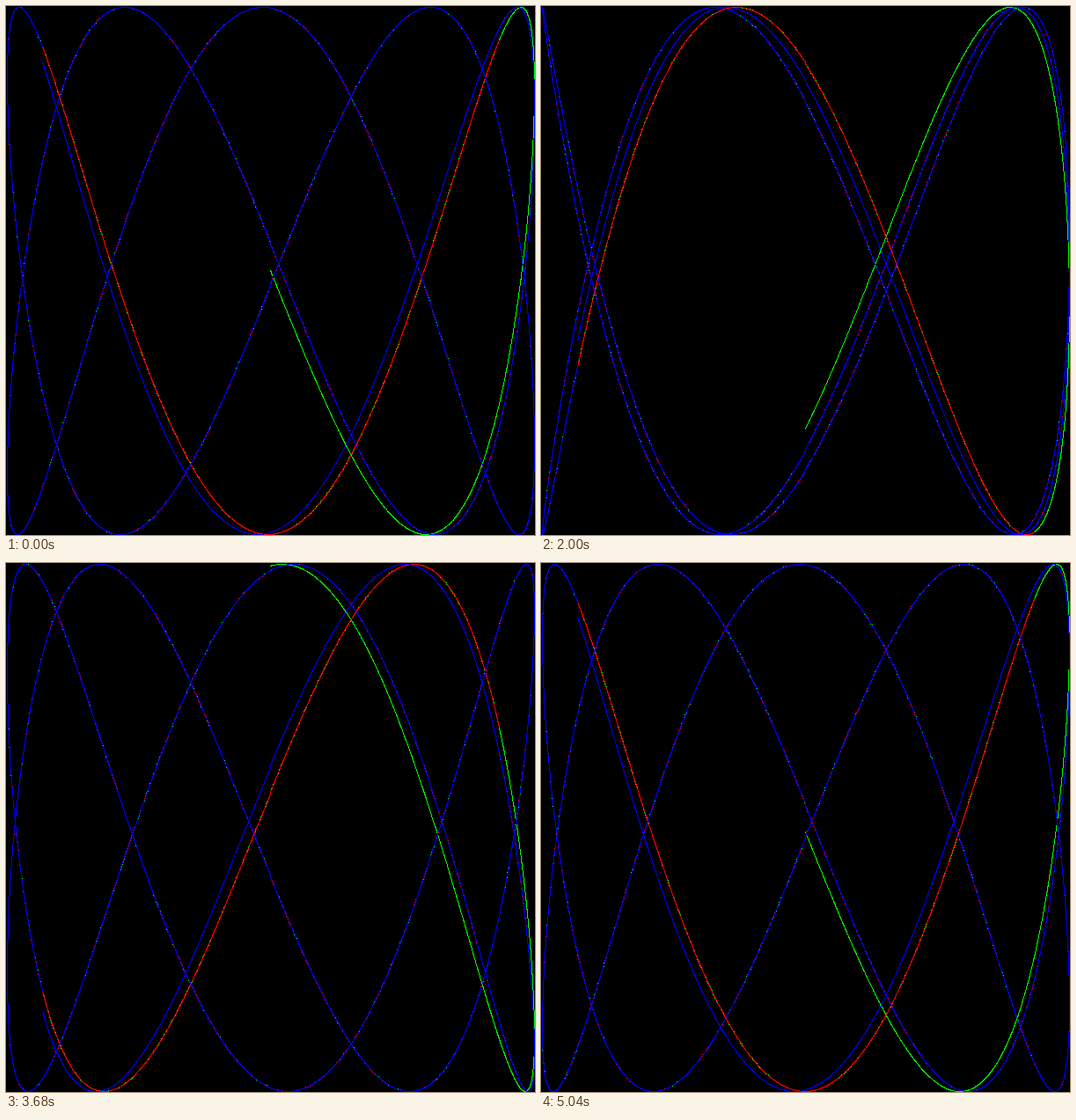
Recreate the animation shown at these times as an HTML page with a canvas. Size 601 by 601 pixels, loop 5.12 s.

```html
<!DOCTYPE html>
<html lang="en">
<head>
<meta charset="utf-8">
<title>Lissajous</title>
<style>
  html, body { margin: 0; width: 100%; height: 100%; overflow: hidden; background: #000; }
  canvas { display: block; width: 601px; height: 601px; image-rendering: pixelated; }
</style>
</head>
<body>
<canvas id="stage" width="601" height="601"></canvas>
<script>
  const SIZE = 300, SIDE = 2 * SIZE + 1;
  const FRAMES = 64, DELAY = 80, PHASE_STEP = 0.1;
  const FREQ = 2.4919, RES = 0.001, SPAN = 4 * Math.PI;
  const COLORS = [0xff00ff00, 0xff0000ff, 0xffff0000]; // ABGR: green, red, blue
  const BLACK = 0xff000000;

  const ctx = document.getElementById('stage').getContext('2d');
  const image = ctx.createImageData(SIDE, SIDE);
  const pixels = new Uint32Array(image.data.buffer);

  const toPixel = v => SIZE + Math.trunc(v * SIZE + 0.5);

  // Each colour traces the same curve, starting a third of a turn later.
  function draw(frame) {
    const phase = frame * PHASE_STEP;
    pixels.fill(BLACK);
    COLORS.forEach((color, i) => {
      const offset = i * 2 * Math.PI / 3;
      for (let t = 0; t < SPAN; t += RES) {
        const a = t + offset;
        const x = toPixel(Math.sin(a));
        const y = toPixel(Math.sin(a * FREQ + phase));
        pixels[y * SIDE + x] = color;
      }
    });
    ctx.putImageData(image, 0, 0);
  }

  const start = performance.now();
  let shown = 0;
  draw(shown);

  function tick() {
    const frame = Math.floor((performance.now() - start) / DELAY) % FRAMES;
    if (frame !== shown) draw(shown = frame);
    requestAnimationFrame(tick);
  }
  requestAnimationFrame(tick);
</script>
</body>
</html>
```
